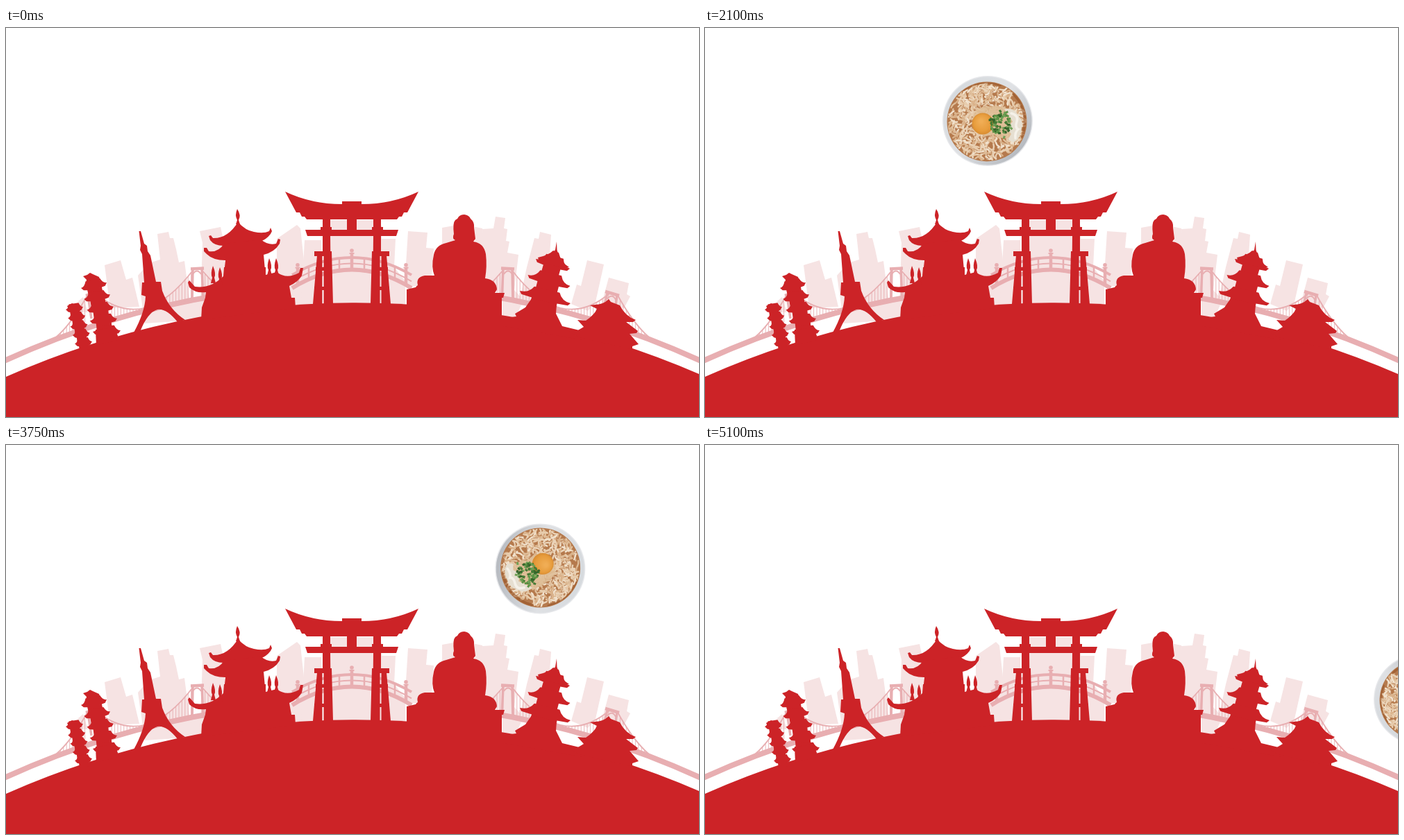
Recreate the animation shown at these times as an HTML page with a canvas. Size 998 by 561 pixels, loop 5.25 s.

```html
<!DOCTYPE html>
<html lang="en">
<head>
<meta charset="utf-8">
<title>Rolling noodle bowl</title>
<style>
html, body { margin: 0; width: 100%; height: 100%; overflow: hidden; background: #fff; }
canvas { display: block; width: 998px; height: 561px; }
</style>
</head>
<body>
<canvas id="stage" width="998" height="561"></canvas>
<script>
const ctx = document.getElementById('stage').getContext('2d');
const RED = '#cc2327', MID = '#e8aeb1', PALE = '#f6e3e3';
const STEP = 150, STEPS = 35, TAU = Math.PI * 2;

function fill(d, color) {
  ctx.fillStyle = color;
  ctx.fill(new Path2D(d));
}

function stroke(d, width, color = MID) {
  ctx.strokeStyle = color;
  ctx.lineWidth = width;
  ctx.stroke(new Path2D(d));
}

function disc(x, y, r, color) {
  ctx.fillStyle = color;
  ctx.beginPath();
  ctx.arc(x, y, r, 0, TAU);
  ctx.fill();
}

function seeded(seed) {
  return () => {
    seed = (seed * 1664525 + 1013904223) % 4294967296;
    return seed / 4294967296;
  };
}

function mirrored(draw, axis) {
  draw();
  ctx.save();
  ctx.translate(axis * 2, 0);
  ctx.scale(-1, 1);
  draw();
  ctx.restore();
}

// ---- far skyline ----
function skyline() {
  [
    'M104 394L111 388L118 410H106Z',
    'M142 342L165 335L173 363L182 360L192 402L150 404Z',
    'M190 357L206 339L222 334L218 297L234 294L236 303L241 303L245 319L249 338L257 336L264 390L288 395V420L200 426Z',
    'M279 293L309 287L313 306L320 400H280L283 310Z',
    'M390 304L419 284L424 289L429 335L442 331V400H390Z',
    'M430 306H454V398H425ZM461 277H535V285H541V398H461ZM541 304H561L559 345L575 365V398H541Z',
    'M579 293L607 295L605 317L616 318L612 372H574Z',
    'M628 288L645 285V312H628ZM672 286L686 289L692 330L680 335Z',
    'M686 290L702 289L705 272L719 274L717 289L722 290L720 307L725 308L722 324L738 327L732 378L745 392L735 416H715V388L690 360Z',
    'M761 303L767 304L769 294L785 298L778 400H738L750 345Z',
    'M814 398L822 370L828 372L837 335L861 341L849 395L838 408Z',
    'M868 360L897 368L894 384L899 387L890 404L858 397Z'
  ].forEach(d => fill(d, PALE));
}

// ---- suspension bridge ----
const deck = x => 1567 - Math.sqrt(1197 ** 2 - (x - 499) ** 2);

function cable(x0, y0, dip, x1, y1) {
  stroke(`M${x0} ${y0}Q${(x0 + x1) / 2} ${dip} ${x1} ${y1}`, 1.8);
  for (let x = x0 + 4.4; x < x1; x += 4.4) {
    const u = (x - x0) / (x1 - x0);
    const y = (1 - u) ** 2 * y0 + 2 * u * (1 - u) * dip + u * u * y1;
    if (y < deck(x)) stroke(`M${x} ${y}V${deck(x)}`, 0.9);
  }
}

function suspension() {
  stroke(`M690 ${deck(690)}A1197 1197 0 0 1 1000 ${deck(1000)}`, 8);
  cable(685, 382, 366, 718, 347);
  cable(727, 347, 443, 870, 382);
  cable(880, 384, 426, 926, 446);
  stroke('M716 346L714 392M729 347L730 393', 3.6);
  stroke('M713 346.5L732 347.5', 4.5);
  stroke('M717 355Q723 346 729 355', 2);
  stroke('M866 382L858 416M880 386L875 419', 3.4);
  stroke('M863 380L883 386', 4.5);
  stroke('M865 391Q874 381 879 394', 2);
}

// ---- arched footbridge ----
function footbridge() {
  const arc = (y, k) => `M412 ${y + k * 7396}Q498 ${y - k * 7396} 584 ${y + k * 7396}`;
  stroke(arc(348.5, 0.0036), 6);
  stroke(arc(331, 0.0034), 4);
  stroke(arc(339.5, 0.0035), 2);
  for (const dx of [0, 18, 62, 78]) {
    for (const x of dx ? [498 - dx, 498 + dx] : [498]) {
      const top = 331 + 0.0034 * dx * dx, tall = dx !== 18 && dx !== 62;
      stroke(`M${x} ${tall ? top - 6 : top}V${top + 18}`, tall ? 4.5 : 2.5);
      if (tall) {
        disc(x, top - 10, 2.8, MID);
        stroke(`M${x - 3.5} ${top - 6}H${x + 3.5}`, 2);
      }
    }
  }
}

// ---- tiered towers: left and right eave tips interpolated down the axis ----
function pagoda(l0, r0, l1, r1, tiers, core, drop) {
  const mix = (a, b, u) => a.map((v, i) => v + (b[i] - v) * u);
  for (let i = 0; i < tiers; i++) {
    const u = i / (tiers - 1);
    const [lx, ly] = mix(l0, l1, u), [rx, ry] = mix(r0, r1, u);
    const cx = (lx + rx) / 2, cy = (ly + ry) / 2;
    const half = (rx - lx) / 2, slope = (ry - ly) / (rx - lx), h = half * core;
    const at = (dx, dy) => `${cx + dx - dy * slope} ${cy + dx * slope + dy}`;
    fill(`M${lx} ${ly}Q${at(-h * 1.3, 0)} ${at(-h, -drop * 0.6)}L${at(h, -drop * 0.6)}Q${at(h * 1.3, 0)} ${rx} ${ry}`
      + `L${at(half - 3, 4)}L${at(h, 5)}L${at(h, drop)}L${at(-h, drop)}L${at(-h, 5)}L${at(3 - half, 4)}Z`, RED);
  }
}

function torii() {
  fill('M402 236Q440 254 484 254V250H512V254Q556 254 594 236L578 266H573L570 272H566L563 276H505V292H491V276H433L430 272H426L423 266H418Z', RED);
  fill('M431 291H565L562 300H434Z', RED);
  mirrored(() => {
    fill('M456 275H467V287H469V292H453V287H456ZM456 299H467L468 398H457.5V329H456Z', RED);
    fill('M444 322H457V329H444ZM448 328H455.5V398H442Z', RED);
    fill('M446 345H468V350H446ZM444 373H469V378H444ZM467 322H469L471 398H467Z', RED);
  }, 498);
}

function castle() {
  fill('M333 261Q339 270 335 277L337 283H331L333 277Q329 270 333 261Z', RED);
  fill('M334 280Q345 292 357 294Q371 297 379 293L381 288L383 293L381 297Q375 305 366 308L368 316L314 320L313 314Q300 314 294 306L292 300L295 299L298 303Q319 304 334 280Z', RED);
  fill('M314 311L367 305Q378 314 389 311L392 304L395 305L394 311Q387 323 371 327L374 360L313 364L316 335Q298 335 289 326L285 322V317L289 317L292 322Q306 324 314 311Z', RED);
  fill('M313 358Q295 376 272 373L264 364L262 367L264 374Q273 383 288 381L287 389L282 403L281 421L417 404L416 389H411L408 372Q421 366 426 357L428 346L424 346L422 353Q404 363 390 352L374 356V345H314Z', RED);
  [[298, 343], [308, 345], [379, 332], [389, 332]].forEach(([x, y]) =>
    fill(`M${x} ${y}Q${x + 5} ${y + 12} ${x + 2} ${y + 17}L${x + 4} ${y + 25}H${x - 3}L${x - 1} ${y + 17}Q${x - 4} ${y + 12} ${x} ${y}Z`, RED));
}

function latticeTower() {
  fill('M191.5 293H194L199 311L203 314L204 322L208 328L216 366H223L225 379Q235 406 258 421L247 424Q231 404 218 406Q204 410 193 438L184 439Q200 410 201 387L195 385L196 367H199L196 326L193 320L194 314Z', RED);
}

function statue() {
  fill('M660 269Q667 270 669 275Q675 280 674 288L676 304L673 308Q688 310 691 326Q693 344 690 361Q706 363 707 377L704 382H718L716 389H714V418H577V377L590 374Q591 372 593 371Q590 359 603 357H617Q612 345 616 327Q619 313 634 310L647 306Q642 304 645 297Q643 281 647 277Q651 275 652 272Q655 269 660 269Z', RED);
}

function shrine() {
  fill('M868 391L871 395L884 400Q892 416 907 421L903 424H893L910 437L908 440L898 441L911 456L902 459V464L825 446L803 433L822 437L832 431L823 421L835 422Q848 413 851 405L841 400L848 399Q860 399 868 391Z', RED);
}

function foreground() {
  fill('M0 503A1240 1240 0 0 1 998 499V561H0Z', RED);
  fill('M111 358L117 356L121 353L125 355L134 359L135 362L131 364L136 371L114 374L116 363Z', RED);
  pagoda([108, 375], [145, 367], [125, 438], [165, 436], 5, 0.56, 13);
  fill('M129 435L157 432L163 450L130 458Z', RED);
  fill('M88 401L95 397L103 400L105 405L91 407Z', RED);
  pagoda([86, 406], [111, 402], [99, 455], [124, 452], 5, 0.56, 11);
  latticeTower();
  castle();
  torii();
  statue();
  fill('M793 308L793.5 320L797 332L782 330L791 320Z', RED);
  pagoda([763, 333], [812, 347], [740, 379], [813, 397], 3, 0.5, 18);
  fill('M766 331Q781 328 788 321L796 324Q799 338 811 345L800 346L768 337Z', RED);
  fill('M757 390L793 398L792 412L801 430L830 437V450L716 430V418L735 416L733 412L748 403Z', RED);
  shrine();
}

// ---- bowl ----
function bowl(x, y, deg) {
  const rnd = seeded(71);
  ctx.save();
  ctx.translate(x, y);
  ctx.rotate(deg * Math.PI / 180);
  const rim = ctx.createLinearGradient(-50, -40, 55, 45);
  rim.addColorStop(0, '#d6dade');
  rim.addColorStop(0.45, '#dfe1e4');
  rim.addColorStop(1, '#b2b6bc');
  disc(0, 0, 65, '#e6e7ea');
  disc(0, 0, 63.5, rim);
  disc(-1, 1, 57.5, '#b57a4d');
  ctx.save();
  ctx.beginPath();
  ctx.arc(-1, 1, 56.5, 0, TAU);
  ctx.clip();
  ctx.lineCap = 'round';
  const tones = ['#ead3b8', '#dfbe9a', '#f1e2ce', '#dab28a', '#e8cdae'];
  for (let i = 0; i < 560; i++) {
    const a = rnd() * TAU, r = Math.sqrt(rnd()) * 54;
    const px = Math.cos(a) * r - 2, py = Math.sin(a) * r + 1;
    const turn = rnd() * TAU, c = Math.cos(turn) * 4, s = Math.sin(turn) * 4, bend = rnd() - 0.5;
    stroke(`M${px - c} ${py - s}Q${px - s * bend * 2} ${py + c * bend * 2} ${px + c} ${py + s}`, 2.4, tones[i % 5]);
    if (i % 4 === 0) stroke(`M${px - c} ${py - s + 2}q${c} ${s + 1} ${c} ${s}`, 1, '#b98058');
  }
  stroke('M-34 -45Q-12 -62 18 -52M38 -38Q61 -15 50 24', 4, 'rgba(151,82,38,.6)');
  fill('M-22 3Q-23 -20 0 -21Q25 -24 38 -12Q48 6 34 24Q22 28 9 20Q-17 26 -22 3Z', 'rgba(222,190,150,.85)');
  fill('M24 -17Q38 -20 44 -8Q52 0 49 11Q47 27 37 31L29 27L34 19L28 10L36 1Z', '#e6dfd1');
  stroke('M34 -11Q45 -8 42 1T44 12Q39 16 40 25', 3.5, '#f5f1e9');
  ctx.restore();
  const yolk = ctx.createRadialGradient(-10, 0, 2, -7, 4, 16);
  yolk.addColorStop(0, '#f0ad55');
  yolk.addColorStop(0.7, '#e79c3c');
  yolk.addColorStop(1, '#d78a30');
  disc(-7, 4, 15.5, yolk);
  const greens = ['#457a35', '#5d9446', '#35652b', '#6fa056'];
  for (let i = 0; i < 76; i++) {
    const a = rnd() * TAU, r = Math.sqrt(rnd());
    const px = 19 + Math.cos(a) * r * 15, py = 5 + Math.sin(a) * r * 20, turn = rnd() * TAU;
    stroke(`M${px} ${py}l${Math.cos(turn) * 4} ${Math.sin(turn) * 4}`, 3, greens[i % 4]);
  }
  ctx.restore();
}

// step, x, y, turn
const KEYS = [
  [0, -78, 400, -162], [1, -45, 364, -152], [4, 43, 274, -122], [7, 152, 209, -94],
  [9, 210, 182, -74], [14, 407, 134, 0], [17, 518, 128, 40], [21, 665, 149, 94],
  [28, 846, 215, 189], [34, 1028, 367, 272]
];

function pose(n) {
  let i = 0;
  while (i < KEYS.length - 2 && n >= KEYS[i + 1][0]) i++;
  const b = KEYS[i], c = KEYS[i + 1], a = KEYS[i - 1] || b, d = KEYS[i + 2] || c;
  const w = c[0] - b[0], u = (n - b[0]) / w;
  return [1, 2, 3].map(k => {
    const m0 = (c[k] - a[k]) / (c[0] - a[0]) * w;
    const m1 = (d[k] - b[k]) / (d[0] - b[0]) * w;
    return b[k] * (1 + 2 * u) * (1 - u) ** 2 + m0 * u * (1 - u) ** 2
      + c[k] * u * u * (3 - 2 * u) + m1 * u * u * (u - 1);
  });
}

function paint(n) {
  ctx.fillStyle = '#fff';
  ctx.fillRect(0, 0, 998, 561);
  skyline();
  mirrored(suspension, 499);
  footbridge();
  foreground();
  if (n > 0) bowl(...pose(n));
}

let shown = -1;
const start = performance.now();
function tick() {
  const n = Math.floor((performance.now() - start) / STEP) % STEPS;
  if (n !== shown) paint(shown = n);
  requestAnimationFrame(tick);
}
paint(0);
requestAnimationFrame(tick);
</script>
</body>
</html>
```
